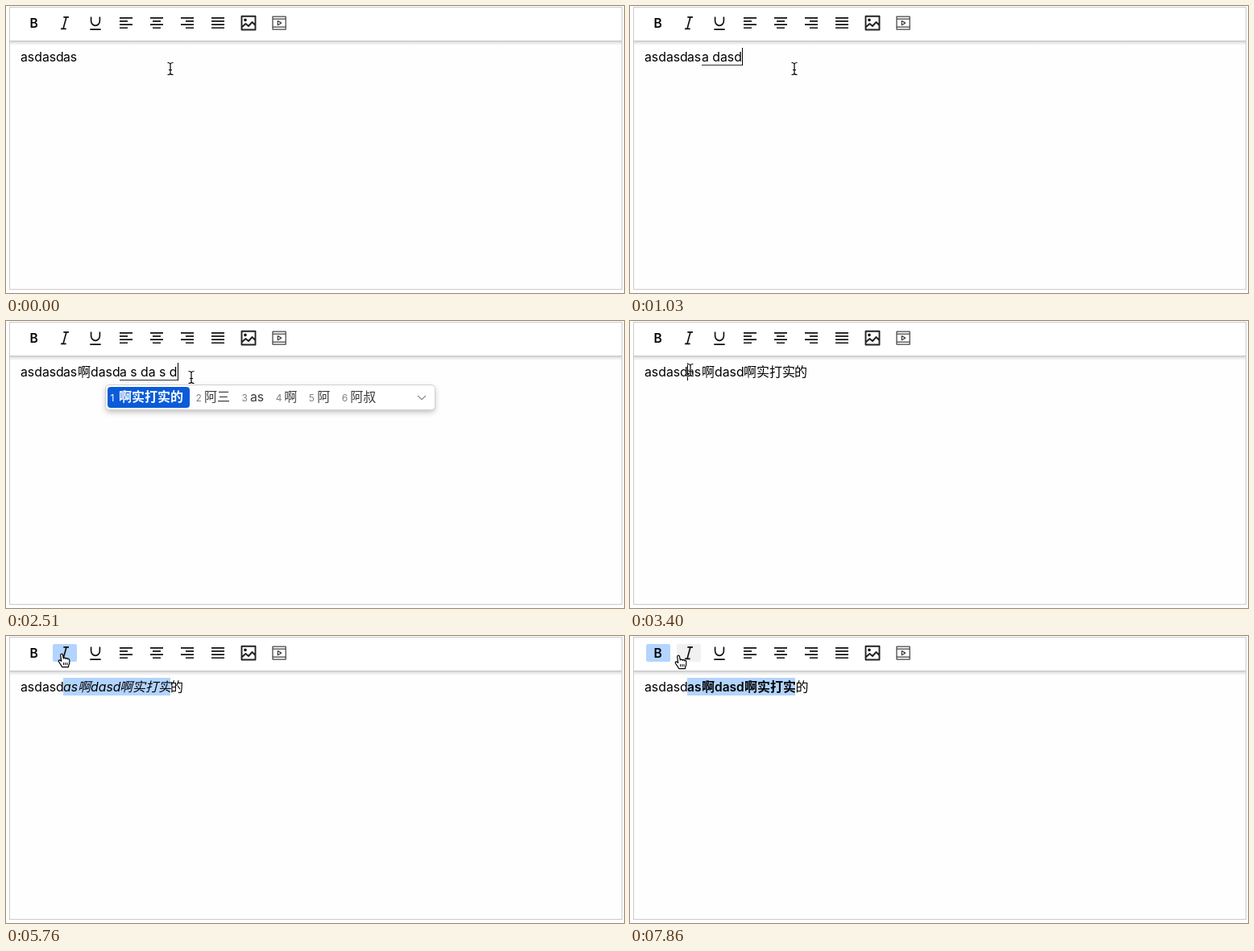
Write an HTML page that moves like this. It is 767 px wide and 357 px high and loops after 8000 ms.

```html
<!DOCTYPE html>
<html lang="en">
<head>
<meta charset="utf-8">
<title>Rich text editor</title>
<style>
  html, body { margin: 0; width: 100%; height: 100%; overflow: hidden; background: #fff; }
  svg { display: block; width: 100vw; height: 100vh; }
  text { font: 15.8px Inter, "Noto Sans CJK SC", "Noto Sans CJK", sans-serif; white-space: pre; }
  text.cjk { font: 16px "Noto Sans CJK SC", "Noto Sans CJK", sans-serif; }
  text.num { font-size: 12px; }
  text.bold { font-weight: 600; font-size: 15.5px; }
  text.cjk.bold { font-weight: 700; font-size: 16px; }
  text.italic { font-style: italic; }
  .icon { fill: none; stroke: #111; stroke-width: 1.67; stroke-linejoin: round; }
</style>
</head>
<body>
<svg viewBox="0 0 767 357">
  <defs>
    <linearGradient id="fade" x2="0" y2="1">
      <stop offset="0" stop-color="#000" stop-opacity=".24"/>
      <stop offset=".4" stop-color="#000" stop-opacity=".1"/>
      <stop offset="1" stop-color="#000" stop-opacity="0"/>
    </linearGradient>
    <filter id="shadow" x="-10%" y="-50%" width="120%" height="220%">
      <feDropShadow dx="0" dy="3" stdDeviation="3.5" flood-opacity=".28"/>
    </filter>
  </defs>
  <rect width="767" height="357" fill="#fff"/>
  <rect x="4.5" y="1.5" width="760" height="351" fill="#fefefe" stroke="#ccc"/>
  <rect x="5" y="2" width="759" height="41" fill="#fff"/>
  <rect x="5" y="43" width="759" height="6" fill="url(#fade)"/>
  <g id="buttons"></g>
  <g id="icons"></g>
  <g id="page"></g>
</svg>
<script>
const LOOP = 8000, BLUE = '#b3d4ff';
const $ = id => document.getElementById(id);
const isCjk = s => /[\u4e00-\u9fff]/.test(s);

function text(x, y, s, cls = '', fill = '#000') {
  return `<text x="${x}" y="${y}" class="${isCjk(s) ? 'cjk ' : ''}${cls}" fill="${fill}">${s}</text>`;
}
function rect(x, y, w, h, fill, extra = '') {
  return `<rect x="${x}" y="${y}" width="${w}" height="${h}" fill="${fill}" ${extra}/>`;
}
function path(d, extra = '') {
  return `<path d="${d}" ${extra}/>`;
}

const probe = document.createElement('canvas').getContext('2d');
probe.font = '15.8px Inter, sans-serif';
function width(s) {
  return [...s].reduce((w, c) => w + (isCjk(c) ? 16 : probe.measureText(c).width), 0);
}

// Toolbar icons
function alignIcon(cx, side) {
  let d = '';
  for (let i = 0; i < 4; i++) {
    const len = side !== 'all' && i % 2 ? 10 : 16;
    const x = side === 'left' ? cx - 8 : side === 'right' ? cx + 8 - len : cx - len / 2;
    d += `M${x} ${14.8 + i * 4.15}h${len}`;
  }
  return path(d);
}
$('icons').innerHTML =
  text(29.5, 26.8, 'B', 'bold') +
  '<g class="icon">' +
  path('M71.3 13.8H78M68 28.3h6.7M75 13.8L71 28.3') +
  path('M104.3 29.2h13.4M116.4 13.5v5a5.4 5.8 0 0 1-10.8 0v-5') +
  ['left', 'center', 'right', 'all'].map((side, i) => alignIcon(149 + i * 38, side)).join('') +
  path('M292.5 12.7h17v16.8h-17zM293 26l4.5-4 3.5 3 4.5-5 4 4', 'stroke-width="1.9" stroke="#222"') +
  '<circle cx="297" cy="17.3" r="1" fill="#222"/>' +
  path('M331 13.2h16.2v15.8h-16.2zM331 16.2h16.2M331 26h16.2M337.3 18.5v5.2l4.4-2.6z',
    'stroke="#444" stroke-width="1.25"') +
  '</g>';

// Timeline: each step changes part of the picture.
// comp: text being composed, done: finished words, cur: [pointer, x, y]
const STEPS = [
  [0, { done: 0, comp: '', pop: null, caret: 0, sel: 0, style: '', cur: ['beam', 204, 78] }],
  [290, { comp: 'a', pop: '啊 阿 呵 a 锕 吖' }],
  [440, { comp: 'a d', pop: '阿弟 啊的 a 啊 阿 呵' }],
  [590, { comp: 'a da', pop: '啊大 阿大 a 啊 阿 呵' }],
  [740, { comp: 'a da s', pop: '啊大神 阿大 a 啊 阿 呵' }],
  [1030, { comp: 'a dasd', pop: null }],
  [1180, { done: 1, comp: '', caret: 141 }],
  [1330, { cur: ['beam', 210, 77] }],
  [1480, { cur: ['beam', 222, 73] }],
  [1620, { cur: ['beam', 230, 70] }],
  [1770, { comp: 'a', pop: '啊 阿 呵 a 锕 吖' }],
  [1920, { comp: 'a s', pop: '阿三 as 啊 阿 阿叔 呵' }],
  [2070, { comp: 'a s d', pop: '啊是的 阿三 as 啊 阿 阿叔' }],
  [2210, { comp: 'a s da', pop: '啊实打 阿三 as 啊 阿 阿叔' }],
  [2360, { comp: 'a s da s', pop: '啊实打实 阿三 as 啊 阿 阿叔' }],
  [2510, { comp: 'a s da s d', pop: '啊实打实的 阿三 as 啊 阿 阿叔' }],
  [2810, { done: 2, comp: '', pop: null, caret: 220 }],
  [2960, { cur: ['beam', 190, 66] }],
  [3110, { cur: ['beam', 112, 62] }],
  [3250, { cur: ['beam', 75, 61] }],
  [3400, { caret: 71 }],
  [3550, { caret: 0, sel: 105, cur: ['beam', 107, 61] }],
  [3690, { sel: 172, cur: ['beam', 174, 62] }],
  [3840, { sel: 204, cur: ['beam', 205, 62] }],
  [3990, { cur: ['beam', 115, 56] }],
  [4140, { cur: ['hand', 42, 29] }],
  [4290, { cur: ['hand', 34, 28] }],
  [4430, { style: 'bold', sel: 205 }],
  [5320, { style: '', sel: 204 }],
  [5470, { cur: ['hand', 48, 25] }],
  [5620, { cur: ['hand', 70, 22] }],
  [5760, { style: 'italic' }],
  [6210, { style: '' }],
  [6360, { cur: ['hand', 86, 22] }],
  [6510, { cur: ['hand', 109, 23] }],
  [6660, { style: 'under' }],
  [6810, { cur: ['hand', 108, 23] }],
  [6960, { style: '' }],
  [7260, { cur: ['hand', 74, 24] }],
  [7410, { cur: ['hand', 36, 25] }],
  [7560, { style: 'bold', sel: 205 }],
  [7710, { cur: ['hand', 48, 24] }],
  [7860, { cur: ['hand', 61, 24] }],
];

function drawButtons({ style, cur }) {
  return ['bold', 'italic', 'under'].map((name, i) => {
    const x = 20 + i * 38;
    const over = cur[0] === 'hand' && cur[1] >= x && cur[1] <= x + 30;
    const fill = style === name ? BLUE : over ? '#f1f1f1' : '';
    return fill && rect(x, 10, 30, 22, fill, 'rx="2"');
  }).join('');
}

function drawText({ done, sel, style }) {
  const wide = style === 'bold' ? 1 : 0;
  const runs = [[71, 'as']];
  if (done > 0) runs.push([89, '啊'], [105, 'dasd']);
  if (done > 1) runs.push([141 + wide, '啊实打实']);
  let out = sel ? rect(71, 52, sel - 71, 22, BLUE) : '';
  out += text(18, 69, 'asdasd');
  out += runs.map(([x, s]) => text(x, 69, s, style)).join('');
  if (done > 1) out += text(204 + wide * 1.4, 69, '的');
  if (style === 'under') out += rect(71, 70, 133, 1, '#000');
  return out;
}

function drawPopup(x, words) {
  let out = rect(x, 80, 408, 30, '#fff', 'rx="4" filter="url(#shadow)"') +
    rect(x - .5, 79.5, 409, 31, 'none', 'rx="4.5" stroke="#d2d2d2"');
  let at = x + 5.5;
  words.split(' ').forEach((word, i) => {
    const w = width(word), first = i === 0;
    if (first) out += rect(x + 2, 82, w + 22, 26, '#0b5cd8', 'rx="4"');
    out += text(at, 100, i + 1, 'num', first ? '#fff' : '#808080');
    out += text(at + 10.5, 100, word, first ? 'bold' : '', first ? '#fff' : '#3c3c3c');
    at += w + (first ? 26 : 25);
  });
  return out + path(`M${x + 387} 93l5 4.6 5-4.6`, 'fill="none" stroke="#8a8a8a" stroke-width="1.2"');
}

function drawPointer([kind, x, y]) {
  const at = `<g transform="translate(${x} ${y})" stroke-linejoin="round">`;
  if (kind === 'beam') {
    const d = 'M-3.5-7.5Q0-7.5 0-5.5Q0-7.5 3.5-7.5M0-6V6M-3.5 7.5Q0 7.5 0 5.5Q0 7.5 3.5 7.5M-2 1.5h4';
    return at + path(d, 'fill="none" stroke="#fff" stroke-width="2.6"') +
      path(d, 'fill="none" stroke="#000" stroke-width="1.2"') + '</g>';
  }
  return at + path('M-1.3 9.3L-2.3 2C-2.6-.1 0-.4.4 1.4L1.4 6C1.6 4.7 4 4.9 4.2 6.3' +
    'C4.6 5.2 6.6 5.5 6.8 6.9C7.2 6.1 8.8 6.4 8.8 8V11C8.8 13 7.6 14 7.4 16.6H-.4' +
    'C-.8 14.6-3.6 12-4.6 9.8C-5.3 8.2-3.4 7.4-2.4 8.5Z', 'fill="#fff" stroke="#000" stroke-width="1.2"') +
    path('M1.6 11v3.2M3.8 11v3.2M6 11v3.2', 'stroke="#000"') + '</g>';
}

function drawPage(s) {
  let out = drawText(s), caret = s.caret;
  if (s.comp) {
    const x = s.done ? 141 : 89, w = Math.round(width(s.comp));
    out += text(x, 69, s.comp) + rect(x, 73, w, 1, '#333');
    caret = x + w;
    if (s.pop) out += drawPopup(x - 17, s.pop);
  }
  if (caret) out += rect(caret, 52, 1, 22, '#000');
  return out + drawPointer(s.cur);
}

let shown = -1;
function render(ms) {
  const t = ms % LOOP;
  const count = STEPS.filter(([at]) => at <= t).length;
  if (count === shown) return;
  shown = count;
  const state = Object.assign({}, ...STEPS.slice(0, count).map(step => step[1]));
  $('buttons').innerHTML = drawButtons(state);
  $('page').innerHTML = drawPage(state);
}

const start = performance.now();
function tick() {
  render(performance.now() - start);
  requestAnimationFrame(tick);
}
tick();
</script>
</body>
</html>
```
